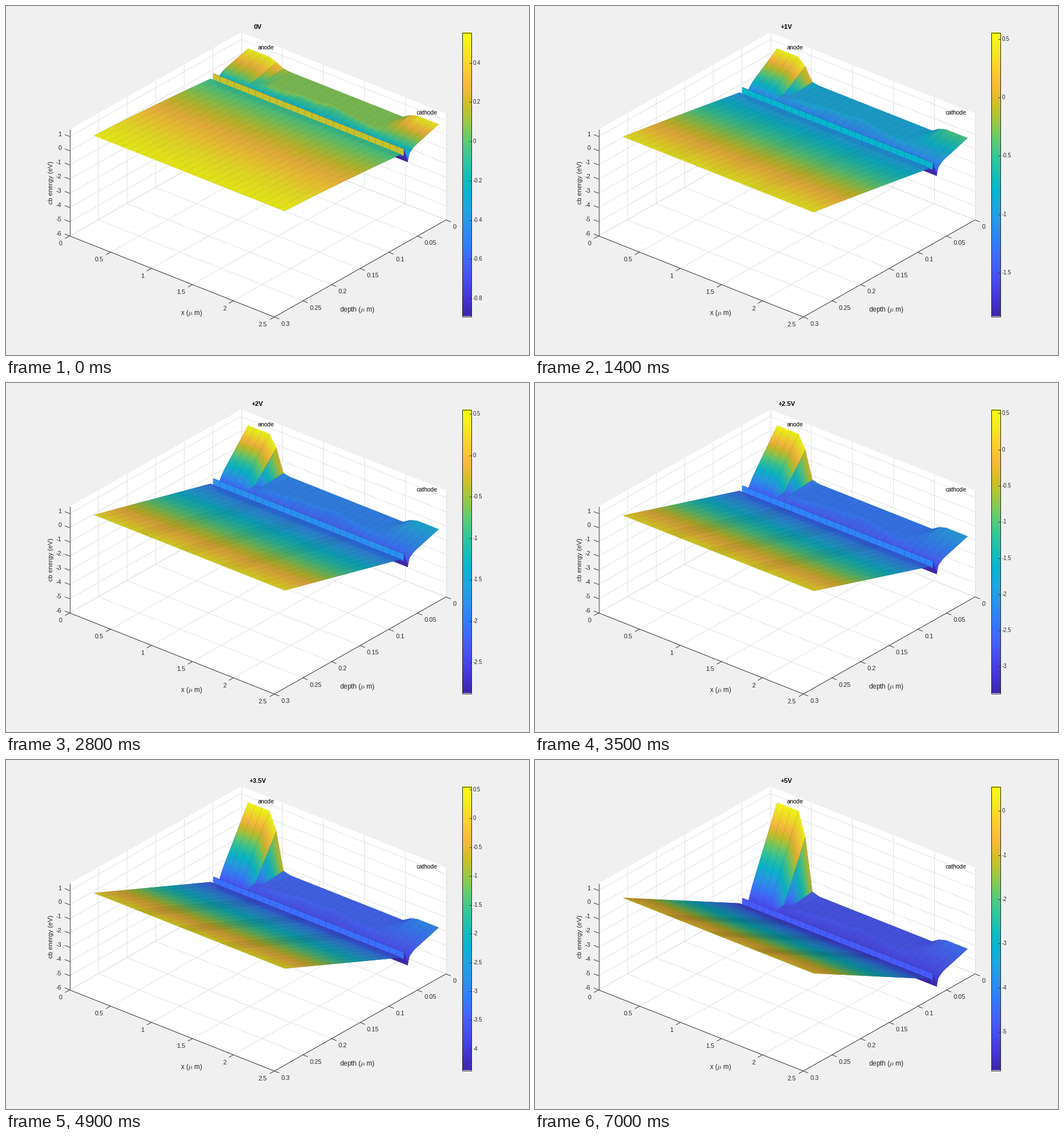
These frames come from a looping animation (917 by 611 pixels, 7.7 s). A matplotlib script:

```python
import numpy as np
import matplotlib.pyplot as plt
from matplotlib.animation import FuncAnimation
from matplotlib.collections import LineCollection, PolyCollection
from matplotlib.colors import LinearSegmentedColormap
from matplotlib.patches import Polygon, Rectangle

W, H, DPI = 917, 611, 100
PX = 72 / DPI
INK = (0.15, 0.15, 0.15)
Z_MIN, Z_MAX = -6, 1.5
CB_X0, CB_X1, CB_TOP, CB_BOT = 799.5, 815.5, 46.5, 543.5
Z_TOP = 0.555

plt.rcParams["font.family"] = "Liberation Sans"
plt.rcParams["mathtext.fontset"] = "cm"
plt.rcParams["axes.unicode_minus"] = False

cmap = LinearSegmentedColormap.from_list("sea_to_sun", [
    (0.242, 0.150, 0.660), (0.271, 0.215, 0.836), (0.281, 0.301, 0.941),
    (0.270, 0.389, 0.991), (0.196, 0.485, 0.989), (0.169, 0.570, 0.936),
    (0.125, 0.646, 0.888), (0.030, 0.708, 0.816), (0.096, 0.750, 0.712),
    (0.216, 0.784, 0.592), (0.391, 0.803, 0.435), (0.617, 0.788, 0.261),
    (0.820, 0.750, 0.154), (0.973, 0.730, 0.239), (0.989, 0.814, 0.189),
    (0.960, 0.914, 0.142), (0.977, 0.984, 0.081)], N=256)


def project(x, d, z):
    """Orthographic view: x to the lower right, depth to the lower left."""
    return (412.5 + 143.6 * x - 1003.3 * d,
            232.5 + 56.8 * x + 566.7 * d - 24.85 * (z - Z_MIN))


def mix(a, b, t):
    return a + (b - a) * np.clip(t, 0, 1)


# ---- surface -------------------------------------------------------------
X0, X1, D1 = 0.084, 2.409, 0.269
xs = np.linspace(X0, X1, 28)
back_d = np.linspace(0, 0.05, 51)
trench_d = np.array([0.051, 0.052, 0.053, 0.054, 0.0606, 0.0612])
slab_d = np.linspace(0.066, D1, 100)
ds = np.concatenate([back_d, trench_d, slab_d])
SPIKE = len(back_d) + 4

volts = np.arange(11) * 0.5
front_z = [0.55, 0.51, 0.47, 0.43, 0.39, 0.35, 0.34, 0.31, -0.35, -0.2, -0.03]


def back_height(v, s):
    x, d = np.meshgrid(xs, back_d)
    q = d / 0.05
    drop = 0.17 * np.clip((d - 0.04) / 0.01, 0, 1) ** 2

    # plateau with a ragged rim that falls towards the trench
    rim = np.interp(x, [0.5, 0.74, 0.96, 1.147, 1.31, 1.61, 1.84, 2.0],
                    [0.037, 0.0376, 0.0295, 0.0316, 0.0255, 0.033, 0.037, 0.034])
    mid = 0.06 - s - 0.3 * np.clip((d - rim) / (0.05 - rim), 0, 1)
    mid += 0.05 * np.exp(-((d - rim - 0.003) / 0.002) ** 2)

    # the anode's side steps down over three columns
    low = -0.07 - s
    anode = mix(0.55, low, q) - drop
    fold = mix(0.37 - 0.3 * v, low, d / 0.037) - drop
    foot = mix(0.12 - 0.98 * s, low, q) - drop
    c3, c4, c5, c6 = xs[3:7]
    z = mix(anode, fold, (x - c3) / (c4 - c3))
    z = np.where(x > c4, mix(fold, foot, (x - c4) / (c5 - c4)), z)
    z = np.where(x > c5, mix(foot, mid, (x - c5) / (c6 - c5)), z)

    cathode = mix(0.53, -0.13, d / 0.048) - s - drop
    x_rise = 1.985 - 0.19 * q
    t = np.clip((x - x_rise) / (2.15 - x_rise), 0, 1)
    return np.where(x > x_rise, mix(mid, cathode, 1 - (1 - t) ** 1.8), z)


def height(i):
    v = volts[i]
    s = max(0, v - 0.03)
    back = back_height(v, s)
    trench = np.array([-0.36, -0.5, -0.68, -0.885, 0.165, -0.32]) - s
    t = (slab_d - slab_d[0]) / (D1 - slab_d[0])
    power = max(1, 1.3 - 0.25 * v)
    slab = front_z[i] - (front_z[i] + 0.08 + s) * (1 - t) ** power
    rest = np.concatenate([trench, slab])[:, None] * np.ones_like(xs)
    return np.vstack([back, rest])


def shading(v):
    """Brightness of each cell: the dense mesh darkens the slab as it tilts."""
    shade = np.ones((len(ds) - 1, len(xs) - 1))
    off = (xs[:-1] + xs[1:]) / 2 - X0
    streak = sum(np.exp(-((off - c) / 0.08) ** 2) for c in (0.6, 1.12, 1.64))
    shade[SPIKE + 1:] = (0.97 - 0.025 * v) * (1 - 0.022 * v * streak)
    return shade


def limits(i):
    return (-0.892 if i == 0 else -0.873 - volts[i]), Z_TOP


def mesh(i):
    z = height(i)
    lo, hi = limits(i)
    x, d = np.meshgrid(xs, ds)
    p = np.stack(project(x, d, z), axis=-1)
    quads = np.stack([p[:-1, :-1], p[:-1, 1:], p[1:, 1:], p[1:, :-1]], axis=2)
    face = cmap((z[:-1, :-1] - lo) / (hi - lo))
    face[..., :3] *= shading(volts[i])[..., None]
    edge = face.copy()
    edge[..., :3] *= 0.82
    return quads.reshape(-1, 4, 2), face.reshape(-1, 4), edge.reshape(-1, 4)


# ---- stage ---------------------------------------------------------------
fig = plt.figure(figsize=(W / DPI, H / DPI), dpi=DPI, facecolor="#f0f0f0")
ax = fig.add_axes([0, 0, 1, 1])
ax.axis("off")


def label(x, y, text, size=11, color=INK, ha="center", **kw):
    return ax.text(x, y, text, fontsize=size * PX, color=color, ha=ha,
                   va="center", zorder=6, **kw)


def lines(segs, color, width, z):
    ax.add_collection(LineCollection(segs, colors=[color], linewidths=width * PX, zorder=z))


def seg(a, b):
    return [project(*a), project(*b)]


def wall(*corners):
    ax.add_patch(Polygon([project(*c) for c in corners], fc="white", ec="none", zorder=0))


XM, DM = 2.5, 0.3
wall((0, 0, Z_MIN), (XM, 0, Z_MIN), (XM, DM, Z_MIN), (0, DM, Z_MIN))
wall((0, 0, Z_MIN), (0, DM, Z_MIN), (0, DM, Z_MAX), (0, 0, Z_MAX))
wall((0, 0, Z_MIN), (XM, 0, Z_MIN), (XM, 0, Z_MAX), (0, 0, Z_MAX))

grid, ticks = [], []
for x in np.arange(6) * 0.5:
    grid += [seg((x, 0, Z_MIN), (x, DM, Z_MIN)), seg((x, 0, Z_MIN), (x, 0, Z_MAX))]
    px, py = project(x, DM, Z_MIN)
    ticks.append([(px, py), (px - 8, py + 4.5)])
    label(px - 12.5, py + 13.5, f"{x:g}", ha="right")
for d in np.arange(7) * 0.05:
    grid += [seg((0, d, Z_MIN), (XM, d, Z_MIN)), seg((0, d, Z_MIN), (0, d, Z_MAX))]
    px, py = project(XM, d, Z_MIN)
    ticks.append([(px, py), (px + 8.5, py + 3.4)])
    label(px + 12, py + 12.5, f"{d:g}", ha="left")
for z in range(-6, 2):
    grid += [seg((0, 0, z), (0, DM, z)), seg((0, 0, z), (XM, 0, z))]
    px, py = project(0, DM, z)
    ticks.append([(px, py), (px - 8.5, py - 3.4)])
    label(97.5, py - 4, str(z), ha="right")
lines(grid, (0.87, 0.87, 0.87), 0.9, 1)

axes_lines = [seg((0, DM, Z_MIN), (0, DM, Z_MAX)),
              seg((0, DM, Z_MIN), (XM, DM, Z_MIN)),
              seg((XM, DM, Z_MIN), (XM, 0, Z_MIN))]
lines(axes_lines + ticks, INK, 0.9, 2)

label(325, 538.5, r"x ($\mu$ m)", 11.8)
label(616, 532, r"depth ($\mu$ m)", 11.8)
label(78.5, 309, "cb energy (eV)", 11.5, rotation=90)
label(441, 73, "anode", 10.4, "black", "left")
label(720, 187, "cathode", 10.4, "black", "left")
title = label(441, 37, "", 11.2, "black", weight="bold")

surface = PolyCollection([], linewidths=0.5 * PX, zorder=3)
ax.add_collection(surface)

# ---- colour bar ----------------------------------------------------------
ax.imshow(np.linspace(1, 0, 256)[:, None], cmap=cmap, aspect="auto", zorder=4,
          extent=(CB_X0, CB_X1, CB_BOT, CB_TOP), interpolation="nearest")
ax.set_xlim(0, W)
ax.set_ylim(H, 0)
ax.add_patch(Rectangle((CB_X0, CB_TOP), CB_X1 - CB_X0, CB_BOT - CB_TOP,
                       fill=False, ec=INK, lw=PX, zorder=5))
bar_ticks = LineCollection([], colors=[INK], linewidths=0.9 * PX, zorder=5)
ax.add_collection(bar_ticks)
bar_labels = [label(819, 0, "", 9.7, ha="left") for _ in range(11)]


def tick_values(lo, hi):
    for step in (0.2, 0.5, 1):
        k = np.arange(np.ceil(lo / step), np.floor(hi / step) + 1)
        if len(k) <= len(bar_labels):
            break
    return np.round(k * step, 1) + 0.0


def update(i):
    quads, face, edge = mesh(i)
    surface.set_verts(quads)
    surface.set_facecolor(face)
    surface.set_edgecolor(edge)
    title.set_text(f"+{volts[i]:g}V" if i else "0V")

    lo, hi = limits(i)
    vals = tick_values(lo, hi)
    ys = CB_TOP + (hi - vals) / (hi - lo) * (CB_BOT - CB_TOP)
    bar_ticks.set_segments([[(CB_X1 - 4, y), (CB_X1, y)] for y in ys])
    for text in bar_labels:
        text.set_text("")
    for text, val, y in zip(bar_labels, vals, ys):
        text.set_text(f"{val:g}")
        text.set_y(y)
    return [surface, title, bar_ticks, *bar_labels]


anim = FuncAnimation(fig, update, frames=len(volts), interval=700,
                     repeat=True, repeat_delay=0, blit=False)
plt.show()
```
